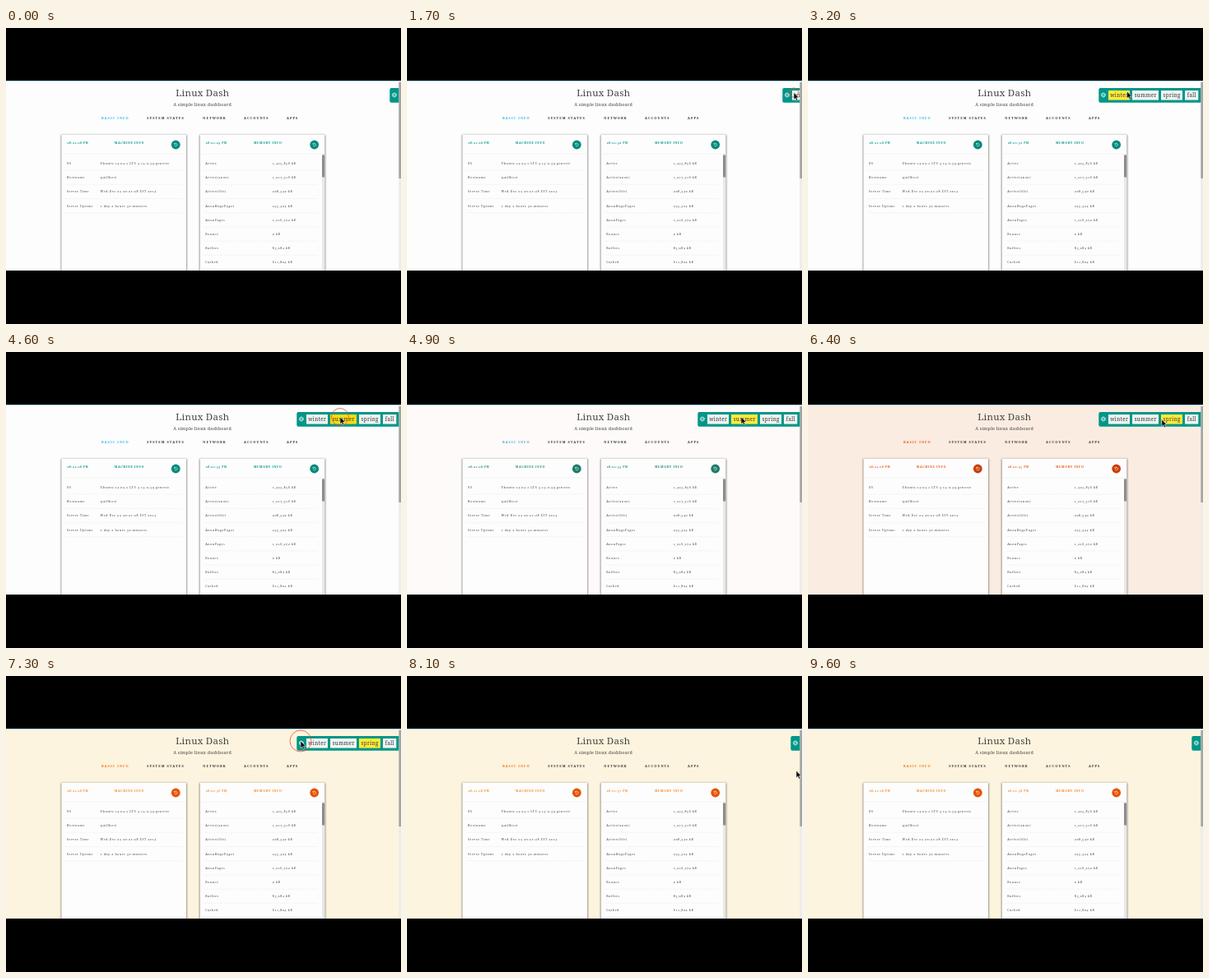
Write an HTML page that moves like this. It is 480 by 360 pixels and loops after 9900 ms.

```html
<!DOCTYPE html>
<html lang="en">
<head>
<meta charset="utf-8">
<title>Linux Dash</title>
<style>
html, body { margin: 0; width: 100%; height: 100%; overflow: hidden; background: #000; }
svg { display: block; width: 480px; height: 360px; }
text { font-family: "Noto Serif", serif; font-variant-numeric: oldstyle-nums; fill: #444; white-space: pre; }
.title { font-size: 11.5px; font-weight: 300; letter-spacing: .25px; }
.sub { font-size: 5.4px; letter-spacing: .2px; }
.nav { font-size: 4px; font-weight: 700; letter-spacing: 1px; fill: #333; }
.head { font-size: 3.7px; font-weight: 700; letter-spacing: .6px; }
.time { font-size: 3.3px; font-weight: 600; letter-spacing: .55px; }
.cell { font-size: 3.6px; letter-spacing: .58px; }
.btn { font-size: 6.2px; letter-spacing: .4px; fill: #333; text-anchor: middle; }
</style>
</head>
<body>
<svg id="stage" viewBox="0 0 480 360">
  <defs>
    <clipPath id="page"><rect x="0" y="64" width="480" height="231"/></clipPath>
    <clipPath id="view"><rect x="0" y="64" width="477.3" height="231"/></clipPath>
    <filter id="soft" x="-10%" y="-10%" width="120%" height="120%"><feGaussianBlur stdDeviation="1.1"/></filter>
  </defs>
  <rect width="480" height="360" fill="#000"/>
  <g clip-path="url(#page)">
    <rect id="bg" y="64" width="480" height="231"/>
    <rect y="64" width="480" height="1" fill="#a9d5ea"/>
    <g id="content"></g>
    <rect x="477.2" y="65" width="2.8" height="230" fill="#ececec"/>
    <rect id="thumb" x="477.4" y="66" width="2.6" height="117"/>
    <g clip-path="url(#view)"><g id="panel"></g></g>
    <circle id="ring" fill="none" stroke="#e8502c" stroke-width=".9"/>
    <path id="cursor" d="M0 0V8.6L2 6.9L3.4 10L4.9 9.3L3.5 6.3H6.2Z" fill="#111" stroke="#fff" stroke-width=".5"/>
  </g>
</svg>
<script>
const LOOP = 9900;
const NS = "http://www.w3.org/2000/svg";
const byId = id => document.getElementById(id);
const content = byId("content"), panel = byId("panel");

function add(parent, tag, attrs, text) {
  const el = document.createElementNS(NS, tag);
  for (const k in attrs) el.setAttribute(k, attrs[k]);
  if (text) el.textContent = text;
  parent.appendChild(el);
  return el;
}
const label = (cls, x, y, s, extra) => add(content, "text", { class: cls, x, y, ...extra }, s);

// Theme colours: page, active tab, card headings, refresh button
const themes = [
  [[253, 253, 253], [41, 182, 230], [0, 150, 136], [0, 137, 123]],
  [[251, 232, 227], [224, 70, 28], [216, 67, 21], [191, 54, 12]],
  [[252, 244, 222], [240, 112, 16], [247, 132, 30], [230, 81, 0]]
];
const tinted = [[byId("bg")], [], [], []];

label("title", 238.7, 83, "Linux Dash", { "text-anchor": "middle" });
label("sub", 238.6, 94.8, "A simple linux dashboard", { "text-anchor": "middle" });
[["BASIC INFO", 116], ["SYSTEM STATUS", 171.3], ["NETWORK", 239.3], ["ACCOUNTS", 289], ["APPS", 341]]
  .forEach(([s, x], i) => {
    const el = label("nav", x, 110.8, s);
    if (!i) tinted[1].push(el);
  });

function card(x, title, titleX, rows, valueX) {
  add(content, "rect", { x: x - .3, y: 130, width: 152.3, height: 175, fill: "#000", opacity: .6, filter: "url(#soft)" });
  add(content, "rect", { x, y: 129.6, width: 151.6, height: 180, fill: "#fdfdfd" });
  add(content, "path", { d: `M${x} 153H${x + 151.6}`, stroke: "#ececec", "stroke-width": .6 });
  const time = label("time", x + 7, 141.3, "08:21:28 PM");
  tinted[2].push(time, label("head", titleX, 141.4, title));
  const cx = x + 138.9;
  tinted[3].push(add(content, "circle", { cx, cy: 142, r: 5.4 }));
  add(content, "path", {
    d: `M${cx - 1.3} 141a1.7 1.7 0 1 1 -.2 1.7M${cx - 1.7} 139.8v1.5h1.5`,
    fill: "none", stroke: "#fff", "stroke-width": .6
  });
  rows.forEach(([name, value], i) => {
    const y = 165.9 + 17.2 * i;
    label("cell", x + 6.4, y, name);
    label("cell", valueX, y, value);
    add(content, "path", { d: `M${x + 5} ${y + 7.2}h${x > 200 ? 138 : 142}`, stroke: "#e2e2e2", "stroke-width": .5, "stroke-dasharray": "1 .6" });
  });
  return time;
}

card(67.4, "MACHINE INFO", 131.8, [
  ["OS", "Ubuntu 14.04.1 LTS 3.13.0-39-generic"],
  ["Hostname", "quillhost"],
  ["Server Time", "Wed Dec 24 20:21:28 EST 2014"],
  ["Server Uptime", "1 day 2 hours 30 minutes"]
], 114.6);
const clock = card(235.8, "MEMORY INFO", 301, [
  ["Active", "1,425,856 kB"], ["Active(anon)", "1,217,316 kB"],
  ["Active(file)", "208,540 kB"], ["AnonHugePages", "235,424 kB"],
  ["AnonPages", "1,216,272 kB"], ["Bounce", "0 kB"],
  ["Buffers", "85,084 kB"], ["Cached", "611,804 kB"]
], 323.8);
add(content, "rect", { x: 384, y: 153.5, width: 3.2, height: 142, fill: "#e9e9e9" });
add(content, "rect", { x: 384, y: 154.5, width: 3.2, height: 27, fill: "#8d8d8d" });

// Season switcher, drawn in its open position
add(panel, "rect", { x: 353.3, y: 73, width: 128, height: 17.8, rx: 2, fill: "#009688" });
add(panel, "circle", { cx: 358.9, cy: 81.5, r: 2.5, fill: "none", stroke: "#fff", "stroke-width": 1, "stroke-dasharray": "1.1 .86" });
add(panel, "circle", { cx: 358.9, cy: 81.5, r: 1.9, fill: "none", stroke: "#fff", "stroke-width": .7 });
add(panel, "circle", { cx: 358.9, cy: 81.5, r: .6, fill: "#fff" });
const buttons = [["winter", 365, 26], ["summer", 394, 32], ["spring", 429, 26], ["fall", 458, 16.3]]
  .map(([s, x, w]) => {
    const el = add(panel, "rect", { x, y: 76, width: w, height: 11.6, fill: "#eef4f2" });
    add(panel, "text", { class: "btn", x: x + w / 2 + .2, y: 83.6 }, s);
    return { el, x, w };
  });

// Pointer: time, x, y
const route = [
  [100, 481, 150], [500, 474.5, 112], [700, 474.5, 112], [1200, 470, 78.5], [1800, 470, 78.5],
  [2300, 432, 80], [2400, 432, 80], [2500, 430, 81], [2700, 430, 81],
  [3200, 387.5, 77], [3700, 387.5, 77], [4400, 406, 79], [4900, 406, 79],
  [5600, 434, 82], [6300, 434, 82], [7000, 358, 79], [7600, 358, 79], [8200, 482, 118]
];
const clicks = [1400, 4500, 6000, 7300];

const clamp = v => Math.min(1, Math.max(0, v));
const ease = v => v * v * (3 - 2 * v);
const ramp = (t, start, length) => ease(clamp((t - start) / length));

function pointer(t) {
  const i = route.findIndex(p => p[0] > t);
  if (i < 1) return [500, 150];
  const [t0, x0, y0] = route[i - 1], [t1, x1, y1] = route[i];
  const k = ramp(t, t0, t1 - t0);
  return [x0 + (x1 - x0) * k, y0 + (y1 - y0) * k];
}

function draw(t) {
  const toSummer = ramp(t, 4700, 800), toSpring = ramp(t, 6100, 800);
  tinted.forEach((els, i) => {
    const rgb = themes[0][i].map((c, j) => {
      const warm = c + (themes[1][i][j] - c) * toSummer;
      return Math.round(warm + (themes[2][i][j] - warm) * toSpring);
    });
    els.forEach(el => { el.style.fill = `rgb(${rgb})`; });
  });

  clock.textContent = `08:21:${29 + Math.floor(t / 1000)} PM`;

  const shift = 113 * (1 - ramp(t, 1600, 550) + ramp(t, 7500, 550));
  panel.setAttribute("transform", `translate(${shift.toFixed(2)} 0)`);

  const [x, y] = pointer(t);
  byId("cursor").setAttribute("transform", `translate(${x.toFixed(2)} ${y.toFixed(2)})`);
  byId("thumb").setAttribute("fill", x > 473 && x < 482 ? "#8c8c8c" : "#a3a3a3");

  const click = clicks.find(c => t >= c && t < c + 400);
  const ring = byId("ring");
  ring.setAttribute("opacity", click === undefined ? 0 : .85);
  if (click !== undefined) {
    ring.setAttribute("cx", x);
    ring.setAttribute("cy", y);
    ring.setAttribute("r", 13 - (t - click) / 40);
  }

  const chosen = t >= 6100 ? 2 : t >= 4700 ? 1 : -1;
  buttons.forEach((b, i) => {
    const over = shift < 1 && x >= b.x && x <= b.x + b.w && y > 75 && y < 88;
    const pressed = over && click !== undefined && t < click + 200;
    b.el.setAttribute("fill", pressed ? "#fbdc10" : over || i === chosen ? "#ffeb3b" : "#eef4f2");
  });
}

const start = performance.now();
function tick() {
  draw((performance.now() - start) % LOOP);
  requestAnimationFrame(tick);
}
draw(0);
requestAnimationFrame(tick);
</script>
</body>
</html>
```
